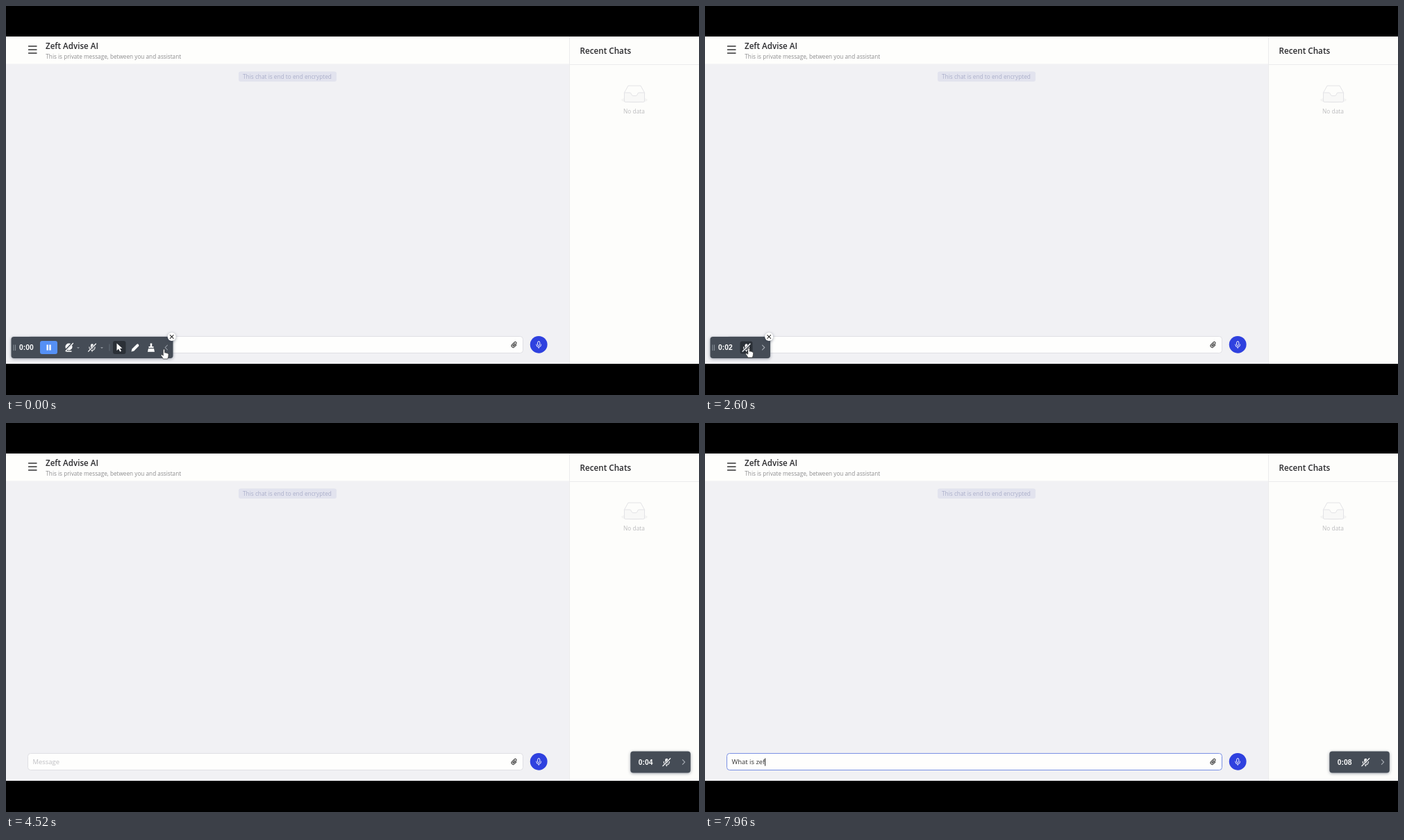
These frames come from a looping animation (998 by 561 pixels, 8000 ms). An HTML page:

```html
<!DOCTYPE html>
<html lang="en">
<head>
<meta charset="utf-8">
<title>Chat screen</title>
<style>
  html, body { margin: 0; width: 100%; height: 100%; overflow: hidden; background: #000; }
  svg { display: block; width: 100vw; height: 100vh; }
  text { font-family: "Open Sans", "Noto Sans", sans-serif; white-space: pre; }
  .line { fill: none; stroke-linecap: round; stroke-linejoin: round; }
  .bar { filter: drop-shadow(0 1px 2px rgba(40, 50, 70, .45)); }
  #time { font: bold 10.3px "Liberation Sans", Arial, sans-serif; }
</style>
</head>
<body>
<svg viewBox="0 0 998 561">
  <defs>
    <clipPath id="screen"><rect y="44" width="998" height="472"/></clipPath>
    <clipPath id="barClip"><rect id="barMask" width="233" height="31" rx="4"/></clipPath>
    <g id="mic" class="line" stroke="#fff" stroke-width=".9">
      <rect x="-1.6" y="-4.8" width="3.2" height="6" rx="1.6"/>
      <path d="M-3.4-.5v.4a3.4 3.4 0 0 0 6.8 0v-.4M0 3.4V5"/>
    </g>
    <g id="micOff">
      <rect x="-2" y="-5.5" width="4" height="7.5" rx="2" fill="#fff"/>
      <path class="line" stroke="#fff" stroke-width="1.1" d="M-4-1v.8a4 4 0 0 0 8 0V-1M0 4V5.6"/>
      <path class="line" stroke="#454c56" stroke-width="2.6" d="M5.2-5.2L-5 5.4"/>
      <path class="line" stroke="#fff" stroke-width="1.3" d="M5.4-5.4L-5.4 5.4"/>
    </g>
    <path id="caretDown" d="M-2-1H2L0 1.3z" fill="#8b929b"/>
  </defs>

  <rect width="998" height="561"/>
  <g clip-path="url(#screen)">
    <rect y="44" width="998" height="472" fill="#f1f1f4"/>
    <rect y="44" width="811" height="39.5" fill="#fefefc"/>
    <rect x="811" y="44" width="187" height="472" fill="#fdfdfb"/>
    <path d="M811.5 44V516M812 84.5H998" stroke="#ebebec"/>
    <path class="line" d="M32.5 58H44M32.5 63H44M32.5 68H44" stroke="#333" stroke-width="1.4"/>

    <text x="57" y="61.7" font-size="11.6" font-weight="600" fill="#2b2b2e">Zeft Advise AI</text>
    <text x="57.3" y="75.5" font-size="8.22" fill="#8d8d8f">This is private message, between you and assistant</text>
    <text x="826.5" y="69" font-size="11.7" font-weight="600" fill="#2b2b2e">Recent Chats</text>

    <rect x="335" y="94.5" width="141" height="14.5" rx="3" fill="#e2e3ee"/>
    <text x="341" y="105.3" font-size="8.3" fill="#abafca">This chat is end to end encrypted</text>

    <ellipse cx="905" cy="135.5" rx="19" ry="4" fill="#f4f4f3"/>
    <path class="line" d="M890.5 125L896 115H914L919.5 125" stroke="#e3e3e6"/>
    <path d="M890.5 125H898Q900 125 900.5 127T903 129.5H907Q909 129.5 909.5 127T912 125H919.5V137Q919.5 138.5 917.5 138.5H892.5Q890.5 138.5 890.5 137z" fill="#f8f8f7" stroke="#e3e3e6"/>
    <text x="889" y="155" font-size="8.4" fill="#bcbcbe">No data</text>

    <rect id="field" x="31.5" y="476.5" width="713" height="24" rx="4" fill="#fefefd"/>
    <text id="entry" x="38.5" y="492.3" font-size="9.45"></text>
    <path id="caret" d="M0 483.5V494.5" stroke="#222"/>
    <g transform="translate(732 488.5) rotate(45) scale(.92)">
      <path class="line" d="M2.6-2V2.4a2.6 2.6 0 0 1-5.2 0V-3a1.8 1.8 0 0 1 3.6 0V2a.9.9 0 0 1-1.8 0V-2" stroke="#333" stroke-width="1.1"/>
    </g>
    <circle cx="767.2" cy="488.3" r="12.4" fill="#2f41df"/>
    <use href="#mic" x="767.2" y="488.5"/>

    <g id="tool">
      <rect id="bar" class="bar" width="233" height="31" rx="4" fill="#454c56"/>
      <g clip-path="url(#barClip)">
        <path id="grip" d="M3.5 11.5V20M6 11.5V20" stroke="#8b929b"/>
        <text id="time" x="11.5" y="19.2" fill="#fff"></text>
        <g id="small">
          <rect id="hover" x="43" y="6.5" width="18" height="18" rx="3" fill="#2b3037"/>
          <use href="#micOff" x="52" y="15.7"/>
          <path class="line" d="M75 12.2L78.3 15.5L75 18.8" stroke="#a3a9b1" stroke-width="1.1"/>
        </g>
        <g id="wide">
          <rect x="41.5" y="6" width="25" height="19" rx="3" fill="#5590f5"/>
          <path d="M52.2 11.5V19.5M56 11.5V19.5" stroke="#fff" stroke-width="2.4"/>
          <circle cx="83" cy="14.5" r="5" fill="#fff"/>
          <path class="line" d="M79.5 21H86.5" stroke="#fff" stroke-width="1.4"/>
          <path d="M88 9.5L78 20" stroke="#454c56" stroke-width="2.8"/>
          <path class="line" d="M89 9.5L78.5 20.5" stroke="#fff" stroke-width="1.2"/>
          <use href="#caretDown" x="96.5" y="16"/>
          <use href="#micOff" x="116.5" y="15.7"/>
          <use href="#caretDown" x="130.5" y="16"/>
          <path d="M141.5 10.5V20.5" stroke="#626a74"/>
          <rect x="146.5" y="6" width="18.5" height="19" rx="3" fill="#2b3037"/>
          <path d="M152 9.5V20L154.6 17.6L156.6 21.6L158.5 20.7L156.6 16.8H160z" fill="#fff"/>
          <path d="M173 21.5L174 17.6L180.8 10.8Q182 9.8 183.2 11T183.6 13.6L176.8 20.5z" fill="#fff"/>
          <path d="M200.2 9.5H202.8V14H205V16H198V14H200.2zM197.5 17H205.5L206.5 21.8H196.5z" fill="#fff"/>
          <path class="line" d="M225 12.2L221.7 15.5L225 18.8" stroke="#8b929b" stroke-width="1.1"/>
        </g>
      </g>
      <g id="close">
        <circle r="6" fill="#fff" class="bar"/>
        <path class="line" d="M-2.4-2.4L2.4 2.4M2.4-2.4L-2.4 2.4" stroke="#333" stroke-width="1.1"/>
      </g>
    </g>

    <path id="hand" d="M-1.2 1Q0-.8 1.2 1V5.2Q2.4 4.2 3.3 5.6Q4.6 4.9 5.2 6.2Q6.6 6 6.6 7.6Q6.7 10.8 5.2 14H-1.2Q-2 11.4-4.2 9.3Q-4.9 7.6-3.1 7.7L-1.2 9.2z" fill="#fff" stroke="#333" stroke-width=".7"/>
    <path id="arrow" d="M0 0V9.4L2.1 7.5L3.6 10.7L5 10L3.6 7H6.4z" fill="#fff" stroke="#333" stroke-width=".7"/>
  </g>
</svg>
<script>
const LOOP = 8000;
const $ = id => document.getElementById(id);
const show = (id, on) => $(id).setAttribute('visibility', on ? 'inherit' : 'hidden');
const move = (id, x, y) => $(id).setAttribute('transform', `translate(${x} ${y})`);
const smooth = p => p * p * (3 - 2 * p);

// Keys are [time, x, y]
const toolKeys = [[2820, 7.5, 477], [3320, 457, 469], [3660, 899.3, 473.5]];
const cursorKeys = [
  [60, 227.5, 495], [200, 228, 494], [440, 228, 494], [640, 150, 490], [700, 150, 490],
  [880, 72, 496.5], [1240, 62, 494], [1920, 62, 494], [2100, 63, 493], [2640, 63, 493],
  [2760, 14, 490], [3320, 633, 478.5], [3560, 906, 488], [3960, 906, 488], [4360, 940, 530]
];
const typed = [[6240, 'W'], [6560, 'h'], [6720, 'a'], [6880, 't'], [7080, ' '],
  [7360, 'i'], [7440, 's'], [7560, ' '], [7680, 'z'], [7800, 'e'], [7920, 'f']];

function along(keys, t) {
  if (t <= keys[0][0]) return keys[0].slice(1);
  for (let i = 1; i < keys.length; i++) {
    const a = keys[i - 1], b = keys[i];
    if (t <= b[0]) {
      const p = smooth((t - a[0]) / (b[0] - a[0]));
      return [a[1] + (b[1] - a[1]) * p, a[2] + (b[2] - a[2]) * p];
    }
  }
  return keys[keys.length - 1].slice(1);
}

function drawTool(t) {
  const shrink = smooth(Math.min(1, Math.max(0, (t - 440) / 160)));
  const width = 233 - 146.5 * shrink;
  const active = t < 4360;
  move('tool', ...along(toolKeys, t));
  $('bar').setAttribute('width', width);
  $('barMask').setAttribute('width', width);
  move('close', width - 1.8, 0);
  show('close', active);
  show('grip', active);
  show('wide', shrink < 1);
  show('small', shrink === 1);
  show('hover', shrink === 1 && t >= 1240 && t < 2680);
  $('time').textContent = '0:0' + Math.floor((t + 80) / 1000);
}

function drawField(t) {
  const focusAt = 5380;
  const focused = (t >= 680 && t < 1280) || t >= focusAt;
  const keys = typed.filter(k => k[0] <= t);
  const text = keys.map(k => k[1]).join('');
  const entry = $('entry');
  $('field').setAttribute('stroke', focused ? '#7a90e4' : '#dfdfe4');
  entry.textContent = text || 'Message';
  entry.setAttribute('fill', text ? '#333' : '#bfbfc3');

  const since = t - (keys.length ? keys[keys.length - 1][0] : focusAt);
  const end = text ? entry.getComputedTextLength() : 0;
  move('caret', 38.8 + end, 0);
  show('caret', since >= 0 && since % 1000 < 500);
}

function drawCursor(t) {
  const [x, y] = along(cursorKeys, t);
  const arrow = t >= 2720;
  move('hand', x, y);
  move('arrow', x, y);
  show('hand', !arrow);
  show('arrow', arrow && t < 4360);
}

function draw(t) {
  drawTool(t);
  drawField(t);
  drawCursor(t);
}

const start = performance.now();
function tick() {
  draw((performance.now() - start) % LOOP);
  requestAnimationFrame(tick);
}
tick();
</script>
</body>
</html>
```
